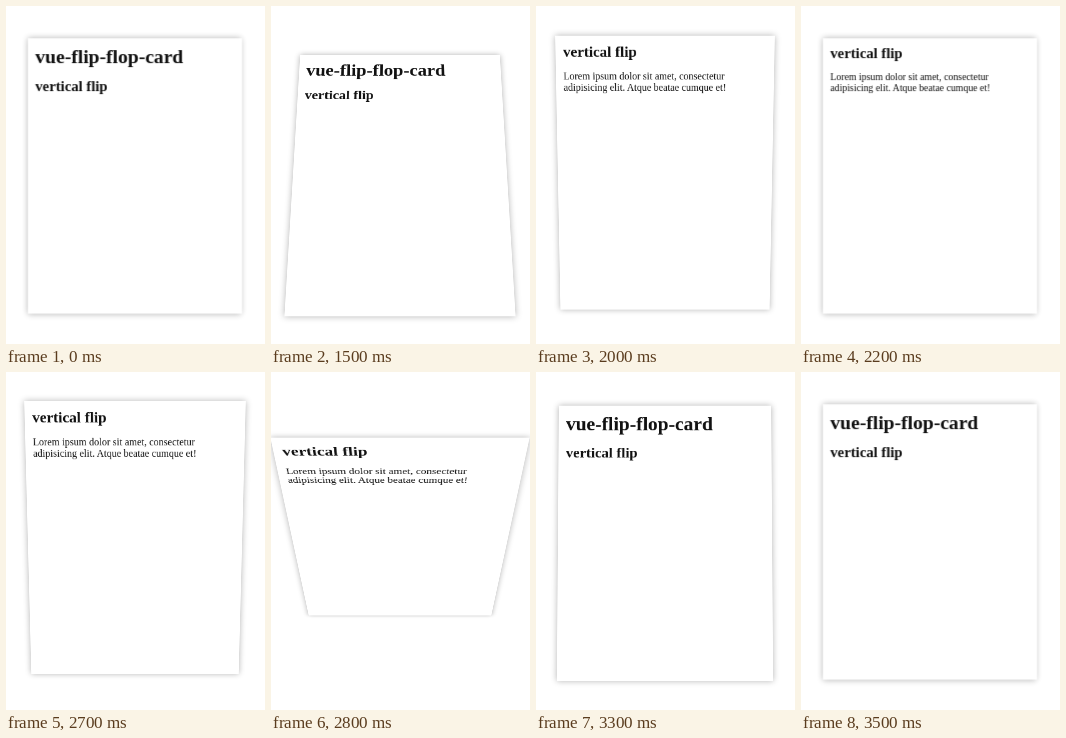
An HTML page for the animation above (4200 ms loop, 259 px wide and 338 px high).

```html
<!DOCTYPE html>
<html lang="en">
<head>
<meta charset="utf-8">
<title>vue-flip-flop-card</title>
<style>
html, body { margin: 0; width: 100%; height: 100%; overflow: hidden; background: #fff; }
#scene {
  position: absolute; left: 128.7px; top: 170px; width: 350px; height: 450px;
  margin: -225px 0 0 -175px; transform: scale(.612); perspective: 1010px;
}
.side {
  position: absolute; inset: 0; box-sizing: border-box; padding: 12px;
  background: #fff; box-shadow: 0 0 10px rgba(0, 0, 0, .3);
  color: #111; font: 16px "Liberation Serif", serif;
}
h1, h2, p { margin: 0 0 16px; }
h1 { font-size: 32px; }
h2 { font-size: 24px; }
</style>
</head>
<body>
<div id="scene">
  <div class="side" id="front">
    <h1>vue-flip-flop-card</h1>
    <h2>vertical flip</h2>
  </div>
  <div class="side" id="back">
    <h2>vertical flip</h2>
    <p>Lorem ipsum dolor sit amet, consectetur adipisicing elit. Atque beatae cumque et!</p>
  </div>
</div>
<script>
const LOOP = 4200, STEP = 100, DURATION = 763;
const FLIP = 1418, RETURN = 2651;
const front = document.getElementById('front');
const back = document.getElementById('back');

// CSS "ease": cubic-bezier(.25, .1, .25, 1)
function ease(x) {
  if (x <= 0) return 0;
  if (x >= 1) return 1;
  const bezier = (s, a, b) => 3 * s * (1 - s) ** 2 * a + 3 * s * s * (1 - s) * b + s ** 3;
  let lo = 0, hi = 1;
  for (let i = 0; i < 30; i++) {
    const mid = (lo + hi) / 2;
    if (bezier(mid, .25, .25) < x) lo = mid; else hi = mid;
  }
  return bezier(lo, .1, 1);
}

function pose(side, angle) {
  side.style.transform = `rotateX(${angle}deg)`;
  side.style.visibility = Math.abs(angle) < 90 ? 'visible' : 'hidden';
}

function draw(now) {
  const t = Math.floor((now % LOOP) / STEP) * STEP;
  // The motion advances in whole steps; the card rests until the first one.
  const turn = t < 1500 ? 0 : ease((t - FLIP) / DURATION) - (t < 2700 ? 0 : ease((t - RETURN) / DURATION));
  pose(front, 180 * turn);
  pose(back, 180 * turn - 180);
}

const start = performance.now();
function tick() {
  draw(performance.now() - start);
  requestAnimationFrame(tick);
}
tick();
</script>
</body>
</html>
```
